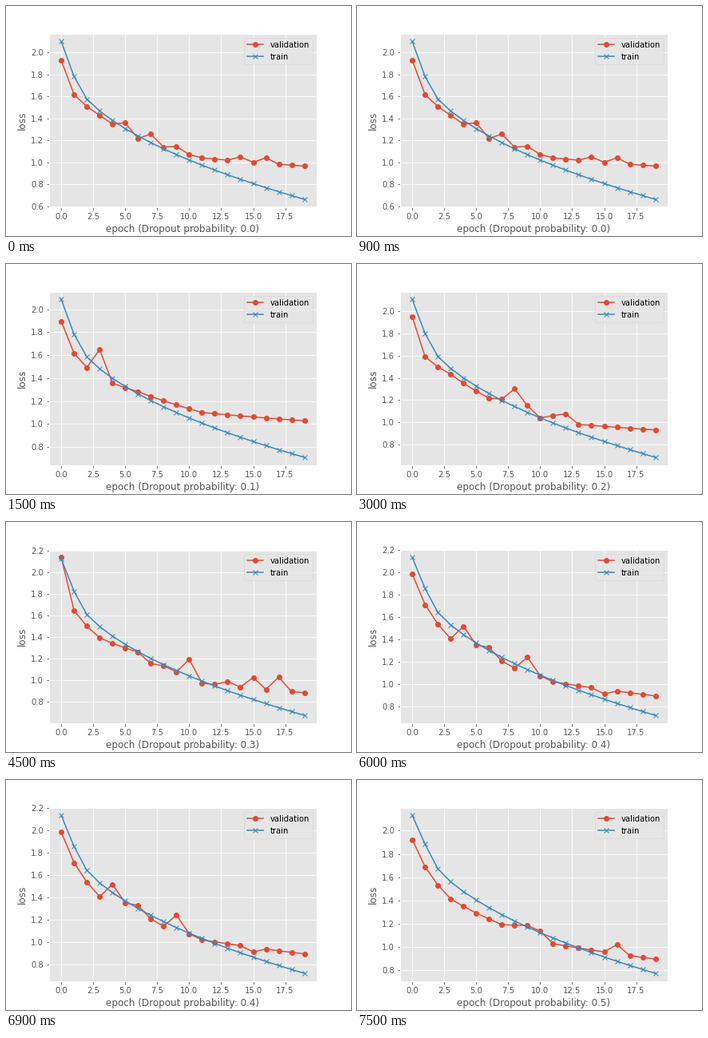
Animation of 432x288 px, one loop 8 s. Source, as a matplotlib script:

```python
import numpy as np
import matplotlib.pyplot as plt
from matplotlib.animation import FuncAnimation

plt.style.use("ggplot")
plt.rcParams["font.family"] = "DejaVu Sans"

STEP_MS = 500
STEPS_PER_SCENE = 3
STEPS = 16
EPOCHS = np.arange(20)
PACE = EPOCHS ** 0.45  # loss falls almost in a line against this

# Per dropout probability: training loss at both ends, the trend of the
# validation loss at TREND_EPOCHS, and the spikes that stand off that trend.
TREND_EPOCHS = [0, 1, 3, 6, 11, 19]
SCENES = [
    ((2.100, 0.662), (1.928, 1.616, 1.427, 1.217, 1.040, 0.965),
     {5: 0.08, 7: 0.08, 9: 0.04, 14: 0.04, 16: 0.05}),
    ((2.0857, 0.708), (1.895, 1.616, 1.400, 1.281, 1.100, 1.027),
     {3: 0.25}),
    ((2.1065, 0.683), (1.950, 1.590, 1.432, 1.217, 1.000, 0.930),
     {7: 0.04, 8: 0.18, 9: 0.07, 11: 0.06, 12: 0.085}),
    ((2.125, 0.674), (2.138, 1.645, 1.393, 1.260, 0.973, 0.884),
     {7: -0.04, 10: 0.17, 13: 0.04, 15: 0.10, 17: 0.125}),
    ((2.133, 0.721), (1.985, 1.711, 1.407, 1.328, 1.021, 0.895),
     {4: 0.14, 7: -0.05, 8: -0.05, 9: 0.11, 15: -0.04}),
    ((2.131, 0.772), (1.924, 1.690, 1.414, 1.240, 1.028, 0.895),
     {8: 0.04, 9: 0.08, 10: 0.07, 16: 0.08}),
]


def through(epochs, values):
    return np.interp(PACE, PACE[epochs], values)


def train_loss(ends, dropout):
    """Quick first epochs, slowed a little by dropout, then a steady fall."""
    start, end = ends
    d2 = dropout ** 2
    fall = [0, 0.222 - 0.16 * d2, 0.365 - 0.11 * d2, 0.440 - 0.08 * d2, 1]
    return start + (end - start) * through([0, 1, 2, 3, 19], fall)


def validation_loss(trend, spikes):
    loss = through(TREND_EPOCHS, trend)
    for epoch, height in spikes.items():
        loss[epoch] += height
    return loss


fig, ax = plt.subplots(figsize=(6, 4), dpi=72)
fig.subplots_adjust(left=0.125, right=0.9, bottom=0.125, top=0.88)
val_line, = ax.plot(EPOCHS, EPOCHS, "o-", label="validation")
train_line, = ax.plot(EPOCHS, EPOCHS, "x-", label="train")
ax.set_ylabel("loss")
ax.legend(loc="upper right")


def update(step):
    scene = step // STEPS_PER_SCENE
    dropout = scene / 10
    ends, trend, spikes = SCENES[scene]
    val_line.set_ydata(validation_loss(trend, spikes))
    train_line.set_ydata(train_loss(ends, dropout))
    ax.relim()
    ax.autoscale_view()
    ax.set_xlabel(f"epoch (Dropout probability: {dropout:.1f})")
    return val_line, train_line


def init():
    return update(0)


anim = FuncAnimation(fig, update, frames=STEPS, init_func=init,
                     interval=STEP_MS, repeat=True, repeat_delay=0, blit=False)
plt.show()
```
